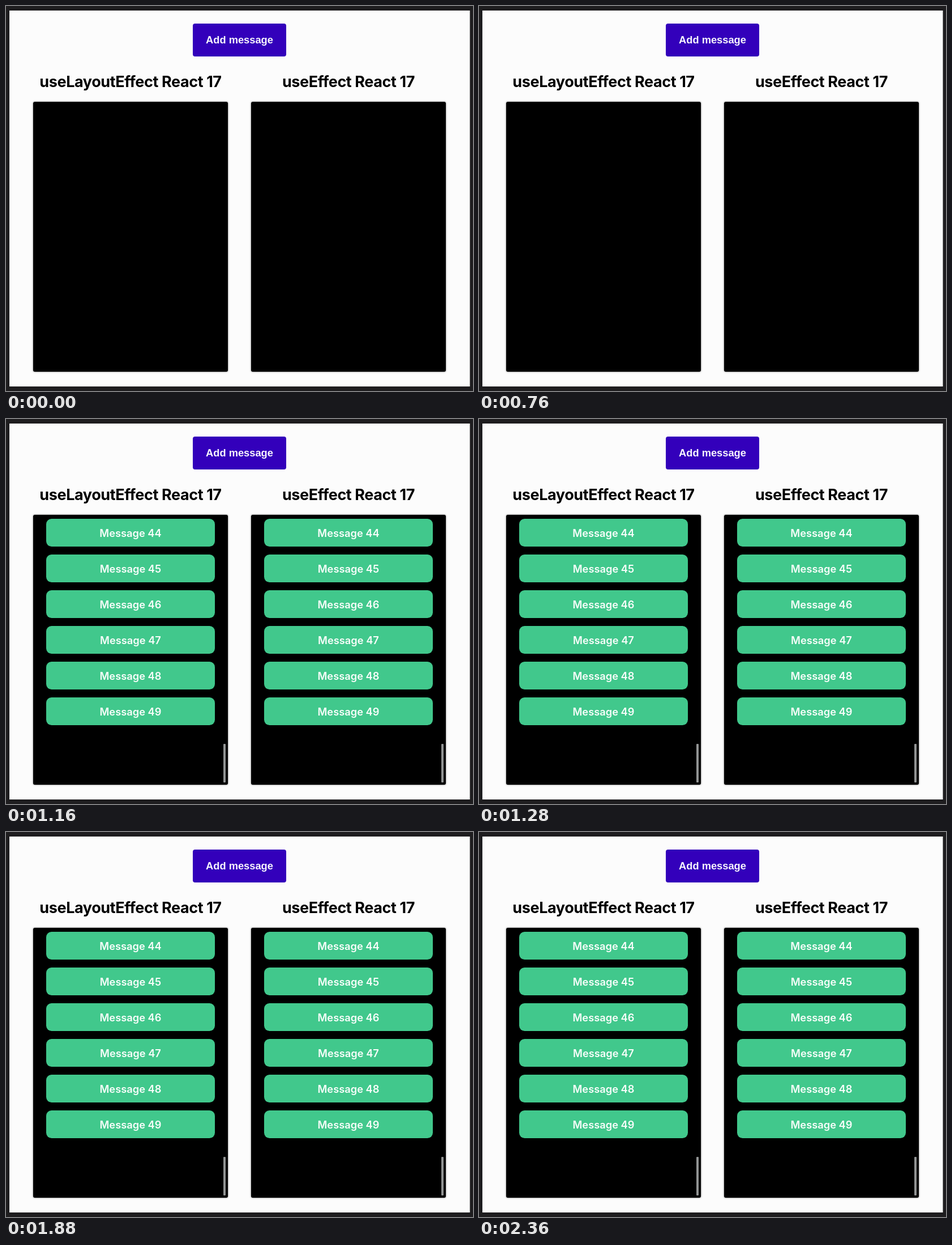
Write an HTML page that moves like this. It is 825x679 px and loops after 2440 ms.

```html
<!DOCTYPE html>
<html lang="en">
<head>
<meta charset="utf-8">
<title>useLayoutEffect and useEffect</title>
<style>
  html, body { margin: 0; width: 100%; height: 100%; overflow: hidden; background: #1e1d1f; }
  svg { display: block; }
  text { text-anchor: middle; font-family: Inter, sans-serif; }
  .button { font: bold 18.3px "Liberation Sans", Arial, sans-serif; fill: #f7f5fd; }
  .title { font-size: 27px; font-weight: 700; letter-spacing: -.4px; }
  .message { font-size: 18.3px; font-weight: 600; fill: #f8fdfa; }
  .panel { filter: drop-shadow(0 0 1.5px rgba(0, 0, 0, .55)); }
</style>
</head>
<body>
<svg width="825" height="679" viewBox="0 0 825 679">
  <defs>
    <clipPath id="view"><rect y="169" width="825" height="476"/></clipPath>
  </defs>
  <rect x="6" y="8" width="813.5" height="663" fill="#fcfcfc"/>
  <rect x="330" y="31" width="165" height="58" rx="4" fill="#3300bb"/>
  <text class="button" x="412.5" y="66">Add message</text>
  <g id="stage"></g>
</svg>
<script>
const LOOP = 2440, ADDED = 1080, SCROLLED = 1160;
const stage = document.getElementById('stage');

const panel = (x, title) => `
  <text class="title" x="${x + 172}" y="143">${title}</text>
  <rect class="panel" x="${x}" y="169" width="344" height="476" rx="3"/>`;

const message = (x, y, n) => `
  <rect x="${x + 23}" y="${y}" width="298" height="49" rx="9.5" fill="#41c88c"/>
  <text class="message" x="${x + 172}" y="${y + 31.5}">Message ${n}</text>`;

function list(x, atEnd) {
  const [first, count, top, bar] = atEnd ? [44, 6, 176, 573] : [0, 8, 192, 173.5];
  const rows = Array.from({ length: count }, (_, i) => message(x, top + i * 63, first + i));
  return `<g clip-path="url(#view)">${rows.join('')}
    <rect x="${x + 336}" y="${bar}" width="4" height="68" rx="1" fill="#929494"/></g>`;
}

const panels = panel(48, 'useLayoutEffect React 17') + panel(433, 'useEffect React 17');
// The layout effect scrolls before paint; the plain effect paints the top first.
const states = [
  panels,
  panels + list(48, true) + list(433, false),
  panels + list(48, true) + list(433, true),
];

let shown = -1;
function draw(now) {
  const t = now % LOOP;
  const state = t < ADDED ? 0 : t < SCROLLED ? 1 : 2;
  if (state !== shown) stage.innerHTML = states[shown = state];
}

const start = performance.now();
function tick() {
  draw(performance.now() - start);
  requestAnimationFrame(tick);
}
tick();
</script>
</body>
</html>
```
